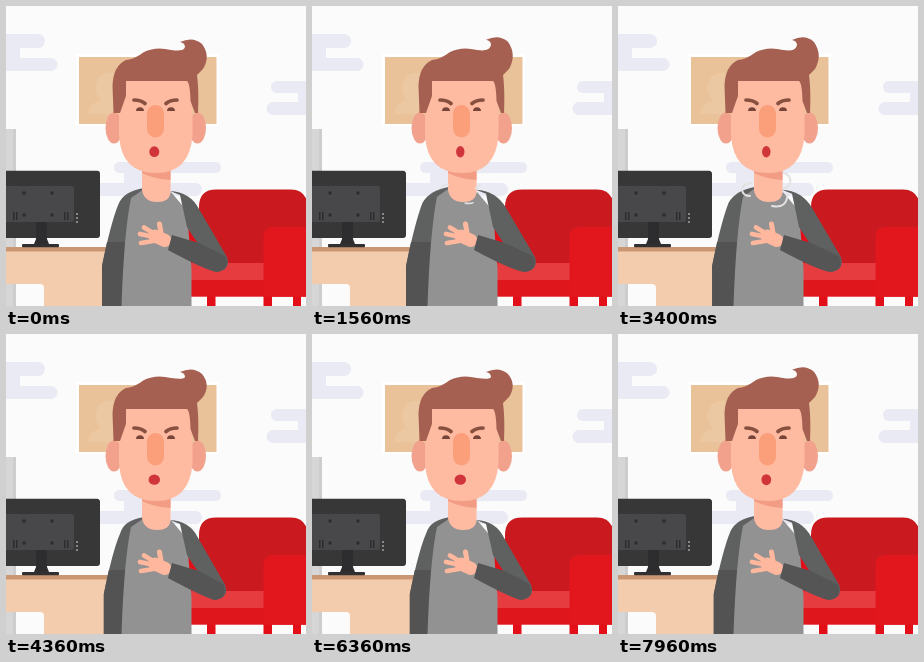
Write an HTML page that moves like this. It is 300 px wide and 300 px high and loops after 8 s.

```html
<!DOCTYPE html>
<html lang="en">
<head>
<meta charset="utf-8">
<style>
html, body { margin: 0; width: 100%; height: 100%; overflow: hidden; background: #fbfbfb; }
svg { display: block; width: 100vw; height: 100vh; }
</style>
</head>
<body>
<svg viewBox="0 0 300 300">
  <rect width="300" height="300" fill="#fbfbfb"/>

  <g fill="#e9eaf4">
    <path d="M0 28H32a7 7 0 0 1 0 14H0z"/>
    <path d="M0 41H14V53H0z"/>
    <path d="M0 52H45a6.500 6.500 0 0 1 0 13H0z"/>
    <path d="M300 75H271a6 6 0 0 0 0 12H300z"/>
    <path d="M292 86h8v11h-8z"/>
    <path d="M300 96H267a6.500 6.500 0 0 0 0 13H300z"/>
    <rect x="108" y="156" width="107" height="11" rx="5.500"/>
    <rect x="118" y="166" width="47" height="12"/>
    <rect x="80" y="177" width="116" height="13" rx="6.500"/>
  </g>

  <g>
    <rect x="70" y="48" width="143" height="72" fill="#fff"/>
    <rect x="73" y="51" width="137.500" height="67" fill="#e9c299"/>
    <path d="M82 108Q84 96 95 94Q86 85 92 73Q99 64 112 68V108z" fill="#ecc8a2"/>
  </g>

  <rect y="123" width="10" height="177" fill="#cdcdce"/>
  <rect y="123" width="7" height="177" fill="#d6d6d7"/>

  <path d="M0 241H102V300H38V282Q38 278 34 278H0z" fill="#f3ccad"/>
  <rect y="241" width="102" height="4.500" fill="#cb9773"/>

  <g>
    <rect x="16" y="238" width="37" height="3.300" rx="1" fill="#303033"/>
    <path d="M0 164.700H91a3 3 0 0 1 3 3V229a3 3 0 0 1-3 3H0z" fill="#373738"/>
    <path d="M30 215H41V233L43 238H28L30 233z" fill="#2d2d2f"/>
    <path d="M0 180H66a2 2 0 0 1 2 2V214a2 2 0 0 1-2 2H0z" fill="#48484a"/>
    <g fill="#2c2c2e">
      <circle cx="18" cy="187" r="1.700"/><circle cx="46" cy="187" r="1.700"/>
      <circle cx="18" cy="209" r="1.700"/><circle cx="46" cy="209" r="1.700"/>
      <path d="M7 206h1.500v8H7zM10 206h1.500v8H10zM58 206h1.500v8H58zM61 206h1.500v8H61z"/>
    </g>
    <path d="M71 207v11" stroke="#88888b" stroke-width="2" stroke-dasharray="2 2"/>
  </g>

  <g>
    <path d="M201 288h8.500v12H201zM257.500 288h8.500v12h-8.500zM287 288h8v12h-8z" fill="#e20f18"/>
    <path d="M180 290V250H193V201Q193 183.500 210 183.500H285Q300 183.500 302 200V290z" fill="#ca1a1f"/>
    <path d="M178 215H193V260H178z" fill="#e20f18"/>
    <rect x="180" y="257" width="80" height="18" fill="#e63c40"/>
    <rect x="180" y="274" width="120" height="16.700" fill="#e0161d"/>
    <path d="M257.500 290.700V231Q257.500 221 268 221H300V290.700z" fill="#e2171e"/>
  </g>

  <path id="leftSleeve" fill="#5f6060"/>
  <path id="leftForearm" fill="#535354"/>
  <path id="torso" fill="#929292"/>
  <path id="rightSleeve" fill="#5f6060"/>
  <path d="M136 155H164.500V186Q164 196 151 196Q138 196 136 184z" fill="#ffbba2"/>
  <path d="M136 160H164.500V174Q148 173 136 167z" fill="#f29c85"/>

  <g stroke="#ffb79d" stroke-linecap="round" fill="none">
    <path d="M149 230L159 234.500" stroke-width="13"/>
    <path d="M147 227L138 221.500M146 230.500L134 228M147 235L135 237" stroke-width="4.700"/>
    <path d="M155 227L153.500 218" stroke-width="5"/>
  </g>
  <path id="rightForearm" fill="#555556"/>

  <g>
    <ellipse cx="108" cy="122" rx="8.500" ry="15.500" fill="#f2a18c"/>
    <ellipse cx="191.500" cy="122" rx="8.500" ry="15.500" fill="#f2a18c"/>
    <path d="M113 67H186.500V129Q184 167 150 167Q115 167 113 129z" fill="#ffbba2"/>
    <path id="hair" fill="#a66051"/>
    <path d="M128 94Q135 94 139 97.500M171 94Q164 94 160 97.500" fill="none" stroke="#87503f" stroke-width="3.700" stroke-linecap="round"/>
    <path d="M130 105a4 3.800 0 0 1 8 0zM161 105a4 3.800 0 0 1 8 0z" fill="#784438"/>
    <rect x="141" y="99" width="17" height="32.500" rx="8.500" fill="#fb9f7a"/>
    <ellipse id="mouth" cx="148.300" cy="145.700" fill="#d0353c"/>
  </g>

  <g id="rings" fill="none" stroke="#e2e2e2" stroke-width="2" stroke-linecap="round">
    <path pathLength="1" d="M154 200Q169 203 169.500 188"/>
    <path pathLength="1" d="M166 182Q170 182 172 177Q174 170 166 167"/>
    <path pathLength="1" d="M133 177Q124 178 124 184Q125 190 132 190"/>
  </g>
</svg>
<script>
const PERIOD = 2000;
const el = id => document.getElementById(id);
const setPath = (id, d) => el(id).setAttribute("d", d);
const clamp = v => Math.max(0, Math.min(1, v));
const rings = [...el("rings").children];

function drawBody(s) {
  const x = 2 * s, y = 1.2 * s;
  setPath("leftSleeve", `M138 ${182 + y}Q118 ${185 + y} ${112.5 + x} ${198 + y}Q${105 + x} 216 ${96 + x} 260V300H118L130 200z`);
  setPath("leftForearm", `M${101 + x} 236H121V300H${96 + x}V260z`);
  setPath("torso", `M138 ${183 + y}L125 ${192 + y}Q118 226 115.500 300H185.500V263L181 205L165 186Q150 204 138 184z`);
  setPath("rightSleeve", `M164 ${185 + y}Q184 ${186 + y} ${193 - x / 2} ${203 + y}L${221 - x} 251Q${225 - x} 264 ${211 - x} 266Q198 262 192 238L181 221L174 ${189 + y}z`);
  setPath("rightForearm", `M166 229L193 237L${219 - x} 250Q${225 - x} 263 ${211 - x} 266Q201 265 162 244z`);
}

function drawHead(s) {
  const y = 2.2 * s;
  setPath("hair", `M107.500 107L106.500 80Q107 60 120 54Q129 53 138 46Q150 40 165 44
    Q178 46 179 ${41 + y}Q179 ${37 + y} 174 ${36 + y}Q187 ${30 + y} 196 ${38 + y}Q205 ${50 + y / 2} 197 63L191 69
    Q193 84 192 107H189L184.500 95Q184 77 181 75H120V90L114 107z`);
  const mouth = el("mouth");
  mouth.setAttribute("rx", 5 + 0.8 * s);
  mouth.setAttribute("ry", 5.4 - 0.3 * s);
}

function drawRings(p) {
  const shown = p > 0.5 && p < 0.82;
  const grow = clamp((p - 0.5) / 0.18);
  const fade = clamp((0.82 - p) / 0.1);
  const size = 0.7 + 0.3 * fade;
  el("rings").style.display = shown ? "" : "none";
  el("rings").setAttribute("transform", `translate(150 184) scale(${size}) translate(-150 -184)`);
  for (const ring of rings) ring.setAttribute("stroke-dasharray", `${grow * fade} 2`);
}

function render(now) {
  const p = (now % PERIOD) / PERIOD;
  const s = Math.sin(2 * Math.PI * p);
  drawBody(s);
  drawHead(s);
  drawRings(p);
}

const start = performance.now();
function tick() {
  render(performance.now() - start);
  requestAnimationFrame(tick);
}
tick();
</script>
</body>
</html>
```
